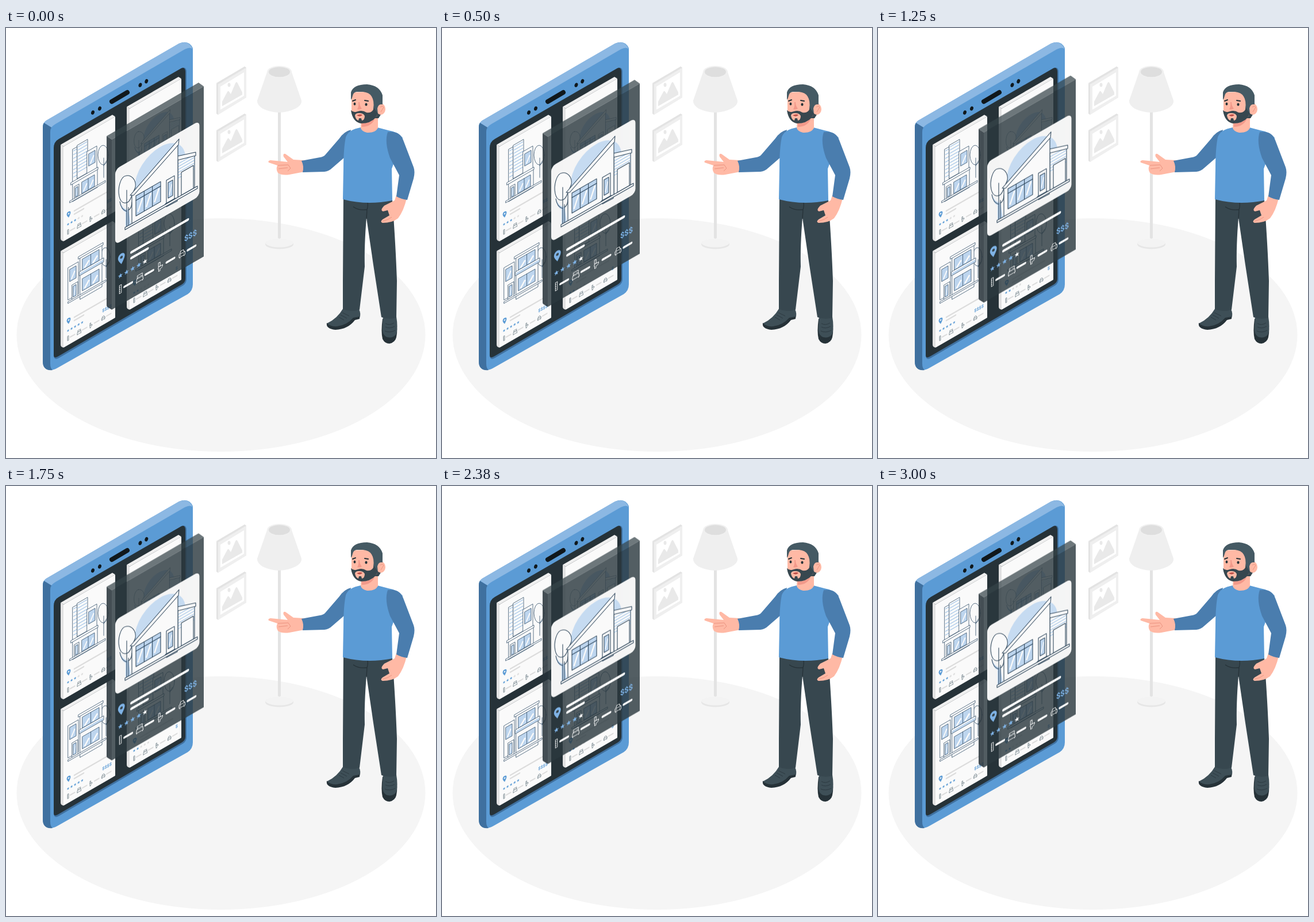
These frames come from a looping animation (748x748 px, 3040 ms). An HTML page:

```html
<!DOCTYPE html>
<html lang="en">
<head>
<meta charset="utf-8">
<title>House listings</title>
<style>
  html, body { margin: 0; width: 100%; height: 100%; overflow: hidden; background: #fff; }
  svg { display: block; width: 100vw; height: 100vh; }
  text { font: 700 7.3px Roboto, "Liberation Sans", sans-serif; text-anchor: end; }
  .line { fill: none; stroke: #37526b; stroke-width: .8; stroke-linejoin: round; stroke-linecap: round; }
  .wall { fill: #fafafa; }
  .glass { fill: #bdd5ee; }
  .blue { fill: none; stroke: #6fa5dc; stroke-width: .8; }
  #popup { animation: float 3040ms linear infinite; }
  #popup .line { stroke: #2b4358; stroke-width: 1.05; }
  @keyframes float { 50% { transform: translateY(-15px); } }
</style>
</head>
<body>
<svg id="stage" viewBox="0 0 748 748">
  <defs>
    <g id="picture">
      <path fill="#e3e3e3" d="M366 96l3 2v53l-3-2z"/>
      <path fill="#efefef" fill-rule="evenodd" d="M366 96L415 67L418 69V121L369 151V98ZM373 102V142L414 118V77Z"/>
      <path fill="#e3e3e3" d="M366 96L415 67L418 69L369 98Z"/>
      <path fill="#e9e9e9" d="M376 136V128L385 111Q387 108 389 112L391 115L399 96Q401 92 403 96L411 112V116Z"/>
      <ellipse cx="388" cy="99" rx="2.5" ry="3.4" fill="#e9e9e9"/>
    </g>
  </defs>

  <ellipse cx="374" cy="534" rx="355.500" ry="203" fill="#f5f5f5"/>
  <use href="#picture"/>
  <use href="#picture" y="82"/>

  <g id="lamp">
    <ellipse cx="475.500" cy="376" rx="24.500" ry="8.500" fill="#e6e6e6"/>
    <ellipse cx="475.500" cy="374" rx="24" ry="7.500" fill="#f3f3f3"/>
    <path fill="#e3e3e3" d="M473 140H478V365Q475.500 368 473 365Z"/>
    <path fill="#efefef" d="M454 77L437 126Q436 133 446 140Q475 154 504 140Q515 134 514 126L497 77Z"/>
    <ellipse cx="475.500" cy="76.500" rx="21.500" ry="10.500" fill="#f0f0f0"/>
    <ellipse cx="475.500" cy="76.500" rx="18.500" ry="8.800" fill="#dedede"/>
  </g>

  <g id="tablet">
    <path fill="#5b9bd5" d="M64 172Q64 165 70 161L301 27Q318 20 325 35V446Q325 457 316 463L90 591Q80 597 72 594Q64 590 64 580Z"/>
    <path fill="#8cb8e3" d="M66 165Q67 163 70 161L301 27Q318 20 325 37Q321 32 311 37L86 167Q81 170 79 173Z"/>
    <path fill="#3f709f" d="M66 165L79 173Q77 176 77 181V584Q77 592 81 595Q64 597 64 580V172Q64 168 66 165Z"/>
    <path fill="#3f709f" d="M83 209Q83 198 92 193L305 70Q314 66 314 77V437Q314 444 308 448L92 574Q83 579 83 569Z"/>
    <path fill="#263238" d="M83 209Q83 198 92 193L305 70Q312 67 312 77V436Q312 442 306 446L91 571Q83 576 83 569Z"/>
    <path stroke="#10181c" stroke-width="8" stroke-linecap="round" d="M184 128L211 112"/>
    <g fill="#10181c">
      <ellipse cx="151" cy="147" rx="2.800" ry="3.800" transform="rotate(20 151 147)"/>
      <ellipse cx="163" cy="140" rx="2.800" ry="3.800" transform="rotate(20 163 140)"/>
      <ellipse cx="233.500" cy="99" rx="2.800" ry="3.800" transform="rotate(20 233 99)"/>
      <ellipse cx="244.500" cy="92.500" rx="2.800" ry="3.800" transform="rotate(20 244 92)"/>
    </g>
  </g>
  <g id="cards"></g>
  <g id="popup"></g>

  <g id="man">
    <path fill="#3e4f57" d="M587 487Q600 493 614 489Q618 497 615 505L607 506Q595 521 573 522Q558 521 558 514Q576 506 587 487Z"/>
    <path fill="#263238" d="M558 513Q564 520 576 519Q593 517 604 504L615 502V506L607 508Q595 524 573 525Q556 523 558 513Z"/>
    <path fill="#263238" d="M655 506Q652 528 655 541Q659 549 667 549Q677 547 679 538Q682 525 678 506Z"/>
    <path fill="#3e4f57" d="M656 500Q667 508 679 502Q682 520 679 532Q674 540 664 538Q656 536 655 526Q655 512 656 500Z"/>
    <path stroke="#263238" stroke-width=".7" fill="none" d="M585 495L597 501M582 499L593 505M579 503L588 508M660 514Q667 518 675 513M660 520Q667 524 676 519M659 527Q667 531 677 526"/>
    <path fill="#37474f" d="M587 290Q628 306 672 299Q678 380 680 440L679 504Q666 508 653 503L639 412L627 330Q623 380 624 415L615 490Q600 495 586 489V440Z"/>
    <path fill="none" stroke="#263238" stroke-width="1.300" d="M627 332L628 316Q614 318 604 311M628 316Q630 309 629 304"/>
    <path fill="#ffb9a5" d="M518 230L500 229L486 219Q481 218 483 224L490 233L460 230Q455 231 457 234L472 239Q469 246 473 252Q480 257 493 255L519 250Z"/>
    <path fill="none" stroke="#eb9481" stroke-width="1" d="M473 239L491 238L495 244L490 249M474 245L490 243"/>
    <path fill="#4a7dae" d="M600 177Q588 180 580 192L555 221Q552 224 546 225L514 231Q519 241 516 251L554 250Q562 249 568 243L590 224Z"/>
    <path fill="#5b9bd5" d="M617 173Q595 177 591 190Q587 210 587 245L586 298Q628 309 672 300L671 245L690 191Q683 181 665 178L646 173Q632 187 617 173Z"/>
    <path fill="#ffb9a5" d="M618 150H647V174Q642 183 628 182Q619 180 617 174Z"/>
    <path fill="#f2998a" d="M619 166Q633 166 642 157Q636 172 619 172Z"/>
    <path fill="#ffb9a5" d="M679 291L697 296Q692 318 682 331Q672 339 655 339Q650 337 655 333L667 326L664 317L656 319Q650 317 658 309L676 300Z"/>
    <path fill="none" stroke="#eb9481" d="M655 336Q665 334 671 329"/>
    <path fill="#4a7dae" d="M664 181Q684 178 691 195L709 242Q712 250 709 262L698 299Q688 298 679 293L684 256L668 226Q658 198 664 181Z"/>

    <path fill="#37474f" d="M645 145L653 149L648 157L641 157Z"/>
    <ellipse cx="652" cy="141" rx="8" ry="10" fill="#ffb9a5"/>
    <path fill="#ffb9a5" d="M601 112V146Q606 165 619 166Q642 164 647 148L649 110Z"/>
    <path fill="#455a64" d="M600 125V112Q604 98 628 98Q650 100 655 117V133Q648 131 646 140L647 150Q640 150 639 140Q641 127 636 119Q632 112 621 111H610Q604 112 603 118Q602 123 600 125Z"/>
    <path fill="#37474f" d="M600 143Q605 148 612 145Q620 142 627 147Q637 149 640 139L647 149L643 156Q634 166 618 166Q603 164 600 143Z"/>
    <path fill="#ffb9a5" d="M607 152Q608 148 614 148Q622 148 624 153Q624 160 619 161L618 157L614 157L613 161Q608 159 607 152Z"/>
    <path fill="#bb4c46" d="M610 152Q615 149 620 151Q618 154 614 153.500Z"/>
    <path fill="#f2998a" d="M613 129Q614 137 611 141Q615 143 619 140Q615 136 615 129Z"/>
    <ellipse cx="606.500" cy="132" rx="1.900" ry="2.500" fill="#263238"/>
    <ellipse cx="626.500" cy="133" rx="2.100" ry="2.600" fill="#263238"/>
    <path fill="none" stroke="#263238" stroke-width="2" stroke-linecap="round" d="M603 127L608 125M624 126L630 127"/>
    <path fill="none" stroke="#eb9481" d="M651 138Q655 134 657 138L652 146"/>
  </g>
</svg>

<script>
const SLOPE = Math.tan(Math.PI / 6);
const BLUE = '#5b9bd5';

const iso = (x, y, body, scale = 1) =>
  `<g transform="matrix(${scale} ${-SLOPE * scale} 0 ${scale} ${x} ${y})">${body}</g>`;
const path = (cls, d) => `<path class="${cls}" d="${d}"/>`;
const ellipse = (cls, x, y, rx, ry) => `<ellipse class="${cls}" cx="${x}" cy="${y}" rx="${rx}" ry="${ry}"/>`;
const bar = (x, y, w, color, width) =>
  `<path d="M${x} ${y}h${w}" stroke="${color}" stroke-width="${width}" stroke-linecap="round"/>`;

// Upright face whose horizontal edges follow the isometric slope
const face = (x, y, w, h) => `M${x} ${y}l${w} ${-w * SLOPE}v${h}l${-w} ${w * SLOPE}z`;
const wall = (...box) => path('line wall', face(...box));

function pane(x, y, w, h, parts) {
  let bars = '', shine = '';
  for (let i = 0; i < parts; i++) {
    const step = w / parts, px = x + i * step, py = y - i * step * SLOPE;
    if (i) bars += `M${px} ${py}v${h}`;
    shine += `M${px + step * .25} ${py + h * .8}L${px + step * .8} ${py + h * .1}`;
  }
  return path('glass', face(x, y, w, h)) +
    `<path d="${shine}" stroke="#fafafa" stroke-width="${w / parts / 6}"/>` +
    path('line', face(x, y, w, h) + bars);
}

function slats(x, y, w, count, gap) {
  let d = '';
  for (let i = 0; i < count; i++) d += `M${x} ${y + i * gap}l${w} ${-w * SLOPE}`;
  return path('blue', d);
}

const tree = (x, y, rx, ry) =>
  ellipse('line wall', x, y, rx, ry) +
  path('line', `M${x + 1} ${y + ry * .3}V${y + ry * 2.3}M${x + 1} ${y + ry * 1.1}l${rx * .5} ${-ry * .5}`);

const villa =
  iso(268, 251, '<circle r="44" fill="#c6dbf1"/>') +
  path('glass', 'M198 300Q202 316 213 316L217 342L208 346V320Q200 318 198 300Z') +
  path('line wall', 'M209 257C199 258 194 279 197 293C200 307 212 308 217 296L225 277C227 264 218 255 209 257Z') +
  path('line', 'M210 282V347M213 312V344M198 302Q200 316 210 319M213 317Q219 313 219 303') +
  path('line wall', 'M299 224L328 219V278L299 295Z') +
  slats(300, 236, 28, 6, 5) +
  path('line wall', 'M305 251L326 239V279L305 291Z') +
  path('line wall', 'M298 223L330 216V222L298 230Z') +
  path('line wall', 'M219 291L299 200V295L219 341Z') +
  path('line wall', 'M216 291L301 193L300 203L222 291Z') +
  pane(226, 292, 43, 35, 3) +
  path('line', 'M226 300L269 275') +
  wall(279, 265, 14, 40) + pane(282, 269, 8, 27, 1) +
  path('line wall', 'M277 306L295 296L298 298V301L279 311L277 309Z') +
  path('line wall', 'M207 347L333 275V279L207 351Z');

const tower =
  tree(169, 221, 9, 17) +
  wall(116, 211, 8, 58) + wall(124, 204, 18, 58) +
  slats(125, 207, 16, 9, 5.5) + slats(117, 214, 6, 8, 6.500) +
  wall(141, 215, 17, 43) + pane(144, 219, 11, 21, 1) +
  wall(116, 269, 43, 33) + path('line wall', face(113, 269, 47, 4)) +
  wall(119, 276, 8, 23) + pane(121, 278, 4, 16, 1) +
  pane(132, 268, 22, 20, 2) +
  path('line wall', face(111, 301, 62, 3));

const terrace =
  tree(173, 398, 8, 16) +
  wall(108, 417, 18, 56) + pane(111, 420, 11, 21, 1) +
  wall(129, 398, 38, 74) + path('line wall', face(126, 398, 43, 4)) +
  pane(133, 402, 29, 19, 2) +
  path('line wall', face(128, 424, 42, 7)) + slats(129, 427, 40, 2, 2) +
  pane(133, 436, 29, 21, 2) +
  wall(115, 447, 10, 26) + pane(117, 449, 5, 19, 1) +
  path('line wall', face(108, 476, 66, 3));

function star(x, y, color) {
  let points = '';
  for (let i = 0; i < 10; i++) {
    const r = i % 2 ? 1.05 : 2.5, a = i * Math.PI / 5;
    points += `${x + r * Math.sin(a)},${y - r * Math.cos(a)} `;
  }
  return `<polygon points="${points}" fill="${color}"/>`;
}

const icons = [
  'M-1-4h2v8h-2zM-1-2h1M-1 0h1M-1 2h1',
  'M-2.200-.5v-3h5v3M-2.800-.5h6l.4 3.500h-6.800zM-2.800 3v1M3 3v1M-1.500-1.500h1.300M.8-1.500h1.300',
  'M-2.200-4h1.700v3.800h-1.700zM-2 0h4q0 2.600-2.600 2.600v1.800h-1.400v-1.800q-.8-1 0-2.600',
  'M-2-.5l.9-2.600h2.700l.9 2.600M-2.700-.5h5.900v3h-5.900zM-2 2.500v1.200M2.400 2.500v1.200M-1.800 1h.9M1.300 1h.9'
];

// Location, rating, price and features of one listing
function info(stars, price, ink, pale, accent, hole) {
  let out = `<path d="M9 129q-3.400-4.600-3.400-7a3.400 3.600 0 0 1 6.800 0q0 2.400-3.400 7z" fill="${accent}"/>` +
    `<circle cx="9" cy="122.200" r="1.350" fill="${hole}"/>` +
    bar(19, 123, 56, pale, 2.5) + bar(19, 128.7, 16, pale, 2.5);
  for (let i = 0; i < 5; i++) out += star(8 + i * 6.1, 140, i < stars ? accent : pale);
  out += `<text x="84" y="142.800" fill="${accent}">${price}</text>`;
  [8, 27, 48, 69].forEach((x, i) => {
    out += `<path transform="translate(${x} 153.300)" d="${icons[i]}" fill="none" stroke="${ink}" stroke-width=".5"/>` +
      bar(x + (i ? 6 : 4), 153.3, 7.5, pale, 2.2);
  });
  return out;
}

function card(x, y, house, stars, price) {
  return iso(x, y, '<rect width="90" height="165" rx="1" fill="#fafafa"/>') +
    `<path fill="#e2e2e2" d="M${x} ${y}l-5-3v163q0 4 5 5z"/>` +
    `<path fill="#f0f0f0" d="M${x} ${y}l-5-3l90 ${-90 * SLOPE}l5 3z"/>` + house +
    iso(x, y, info(stars, price, '#455a64', '#dcdcdc', BLUE, '#fafafa'));
}

const shift = (t, body) => `<g transform="${t}">${body}</g>`;

document.getElementById('cards').innerHTML =
  card(100, 206, tower, 3, '$$') +
  card(215, 140, shift('translate(105 26) scale(.6)', villa), 4, '$$$') +
  card(100, 391, terrace, 5, '$$$$') +
  card(215, 325, shift('translate(115 119)', tower), 2, '$');

document.getElementById('popup').innerHTML =
  `<path fill="#2c393f" fill-opacity=".81" d="${face(184, 194, 160, 296)}"/>` +
  '<path fill="#263238" fill-opacity=".86" d="M175 188L184 194V490L176 485Q175 484 175 482Z"/>' +
  '<path fill="#37444a" fill-opacity=".72" d="M175 188L335 95L344 101.600L184 194Z"/>' +
  iso(190, 246, '<rect width="146.500" height="131" rx="8" fill="#f7f7f7" fill-opacity=".985"/>') +
  villa +
  iso(185, 194, info(4, '$$$', '#fff', '#fff', '#7fb3e6', '#37444a'), 1.75);
</script>
</body>
</html>
```
